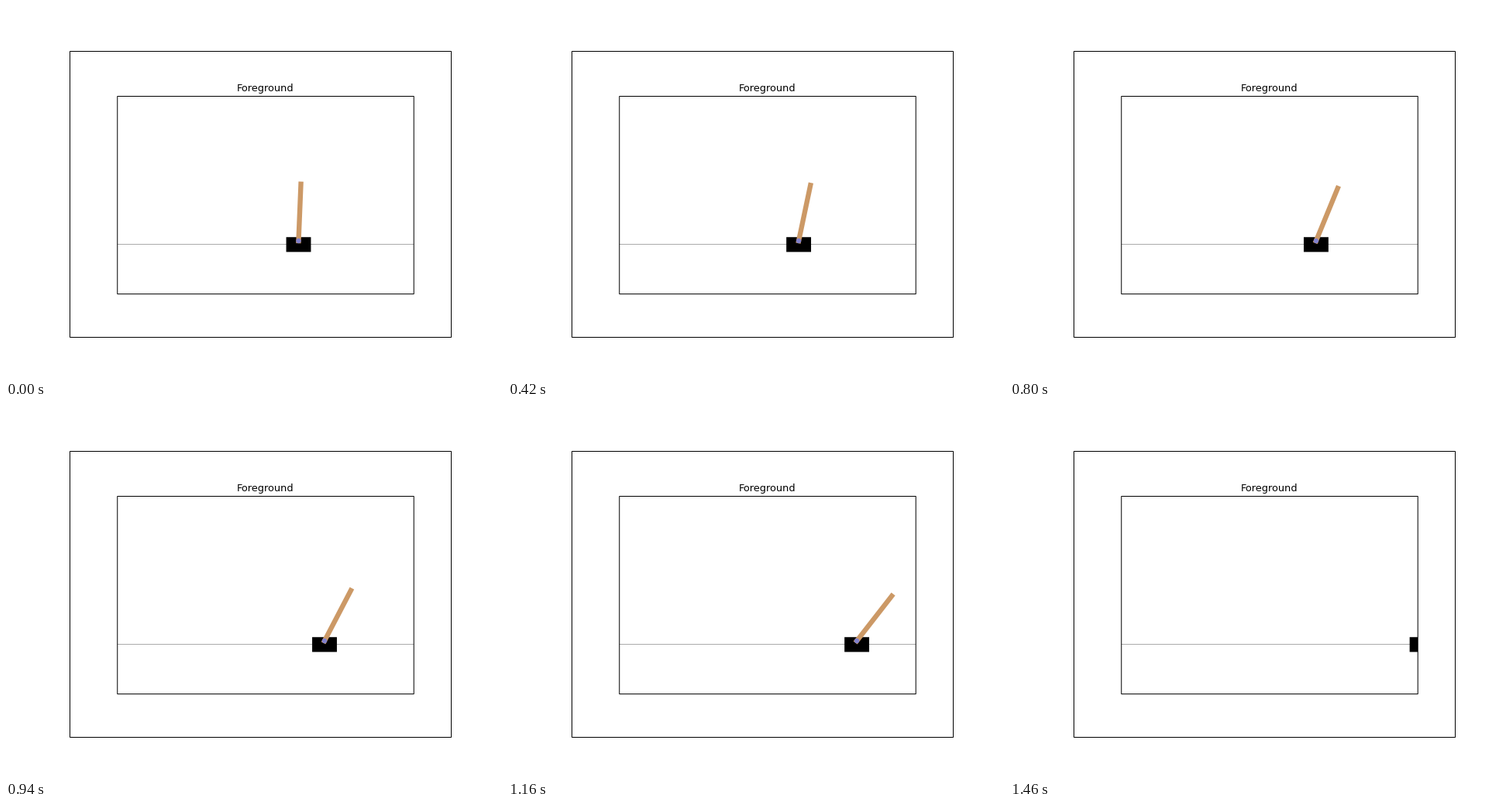
A matplotlib script that plays this animation: 640 px wide and 480 px high, repeating every 1480 ms.

```python
import numpy as np
import matplotlib.pyplot as plt
from matplotlib.animation import FuncAnimation
from matplotlib.patches import Circle, Polygon, Rectangle

W, H, DPI = 640, 480, 100
FRAMES, STEP_MS = 74, 20
PX = 72 / DPI                      # one pixel in points
SCALE = 0.6375                     # simulator pixels to stage pixels
CART_W, CART_H = 50 * SCALE, 30 * SCALE
HALF_POLE, POLE_LEN = 5 * SCALE, 120 * SCALE
TRACK_Y = 307.8
AXLE_Y = TRACK_Y - CART_H / 4

# Key poses: step, cart centre in pixels, pole angle in radians
STEPS = np.array([0, 13, 21, 33, 47, 58, 73], float)
CART_X = np.array([377.5, 374.5, 375.1, 384.3, 411.0, 450.1, 531.6])
ANGLE = np.array([0.041, 0.137, 0.208, 0.313, 0.481, 0.662, 0.970])


def smooth(t, keys):
    """Cubic Hermite curve through the key poses."""
    slopes = np.gradient(keys, STEPS, edge_order=2)
    i = min(np.searchsorted(STEPS, t, side="right") - 1, len(STEPS) - 2)
    h = STEPS[i + 1] - STEPS[i]
    u = (t - STEPS[i]) / h
    return ((1 + 2 * u) * (1 - u) ** 2 * keys[i]
            + u * (1 - u) ** 2 * h * slopes[i]
            + u * u * (3 - 2 * u) * keys[i + 1]
            + u * u * (u - 1) * h * slopes[i + 1])


def pole_corners(x, angle):
    along = np.array([np.sin(angle), -np.cos(angle)])
    across = np.array([np.cos(angle), np.sin(angle)]) * HALF_POLE
    axle = np.array([x, AXLE_Y])
    low, high = axle - along * HALF_POLE, axle + along * POLE_LEN
    return [low - across, low + across, high + across, high - across]


def frame_box(left, top, right, bottom):
    box = Rectangle((left, top), right - left, bottom - top, fill=False,
                    ec="black", lw=PX, snap=False, zorder=5)
    return ax.add_patch(box)


fig = plt.figure(figsize=(W / DPI, H / DPI), dpi=DPI, facecolor="white")
ax = fig.add_axes([0, 0, 1, 1])
ax.set_xlim(0, W)
ax.set_ylim(H, 0)
ax.axis("off")

frame_box(82.5, 58.5, 574.5, 427.5)
view = frame_box(143.75, 116.5, 526.25, 371.6)
ax.text(334.3, 110, "Foreground", family="DejaVu Sans", fontsize=9.24,
        ha="center", va="baseline")
ax.plot([143.75, 526.25], [307.5, 307.5], color="0.67", lw=PX, snap=False,
        solid_capstyle="butt", zorder=1)

cart = Rectangle((0, TRACK_Y - CART_H / 2), CART_W, CART_H, fc="black",
                 lw=0, snap=False, zorder=2)
pole = Polygon(pole_corners(0, 0), fc=(0.8, 0.6, 0.4), lw=0, snap=False,
               zorder=3)
axle = Circle((0, AXLE_Y), HALF_POLE, fc=(0.5, 0.5, 0.8), lw=0, zorder=4)
for part in (cart, pole, axle):
    ax.add_patch(part)
    part.set_clip_path(view)


def draw(step):
    x, angle = smooth(step, CART_X), smooth(step, ANGLE)
    cart.set_x(x - CART_W / 2)
    pole.set_xy(pole_corners(x, angle))
    axle.center = x, AXLE_Y
    return cart, pole, axle


anim = FuncAnimation(fig, draw, frames=FRAMES, interval=STEP_MS, repeat=True,
                     repeat_delay=0)
plt.show()
```
